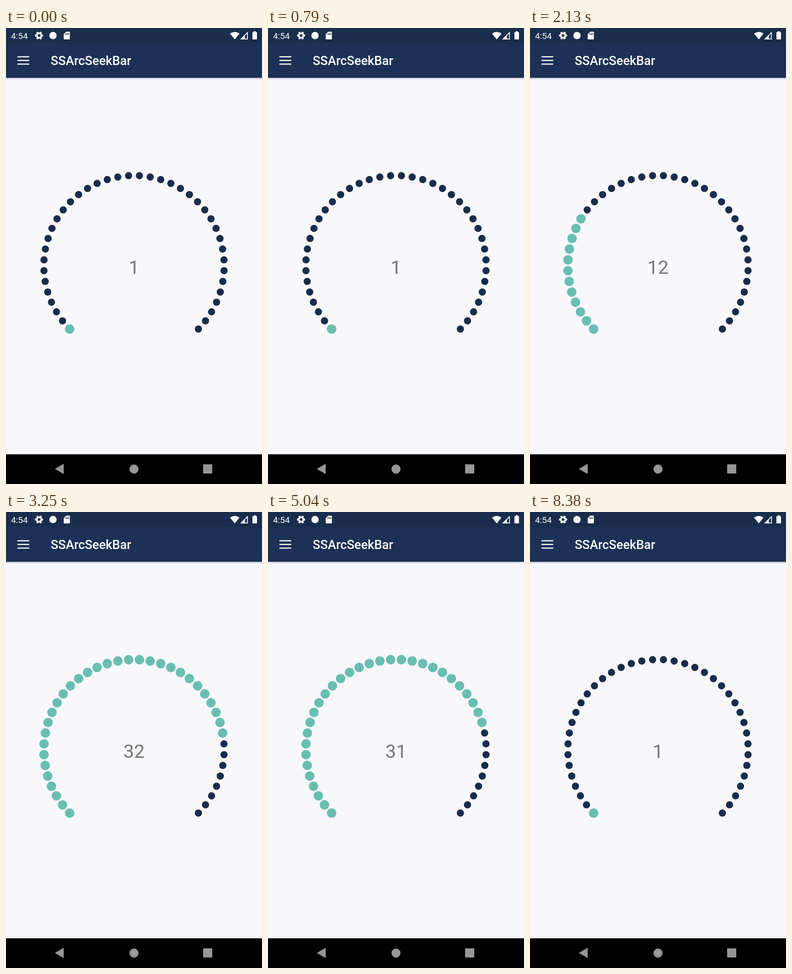
An HTML page for the animation above (8420 ms loop, 561 by 998 pixels).

```html
<!DOCTYPE html>
<html lang="en">
<head>
<meta charset="utf-8">
<title>SSArcSeekBar</title>
<style>
  html, body { margin: 0; width: 100%; height: 100%; overflow: hidden; background: #f8f8fc; }
  svg { display: block; width: 561px; height: 998px; font-family: Roboto, sans-serif; }
</style>
</head>
<body>
<svg viewBox="0 0 561 998">
  <defs>
    <linearGradient id="shadow" x2="0" y2="1">
      <stop stop-color="#c9ccd5"/>
      <stop offset="1" stop-color="#f8f8fc"/>
    </linearGradient>
  </defs>
  <rect width="561" height="998" fill="#f8f8fc"/>
  <rect y="109" width="561" height="5" fill="url(#shadow)"/>
  <rect width="561" height="109" fill="#1c3155"/>
  <rect width="561" height="33" fill="#1a2d4d"/>

  <g fill="#fff">
    <text x="11" y="24" font-size="19.1">4:54</text>
    <!-- gear -->
    <g fill="none" stroke="#fff">
      <circle cx="72.5" cy="16.5" r="4.8" stroke-width="3.6"/>
      <path id="teeth" stroke-width="4.4"/>
    </g>
    <circle cx="103" cy="16.5" r="8"/>
    <!-- memory card -->
    <path fill-rule="evenodd" d="M132 8H138.500Q140 8 140 9.500V23.500Q140 25 138.500 25H128Q126.500 25 126.500 23.500V13.500Z
      M130.500 11.500V15H132.200V11.500Z M133.500 11.500V15H135.200V11.500Z M136.500 11.500V15H138.200V11.500Z"/>
    <!-- wifi, signal, battery -->
    <path d="M501.300 25L491 12.200Q501.300 4.800 511.600 12.200Z"/>
    <path fill-rule="evenodd" d="M530 8V25H513Z M528.300 12.200L523.500 17V23.300H528.300Z"/>
    <path d="M543 9V7H547.200V9H549Q550 9 550 10V24Q550 25 549 25H541Q540 25 540 24V10Q540 9 541 9Z"/>
    <path d="M25 63H51M25 71H51M25 79H51" stroke="#fff" stroke-width="2.500"/>
    <text x="98" y="81" font-size="27.300" font-weight="500">SSArcSeekBar</text>
  </g>

  <g id="dots"></g>
  <text id="value" x="280.500" y="537.500" font-size="41.500" fill="#757575" text-anchor="middle"></text>

  <rect y="933" width="561" height="65"/>
  <g fill="#979797" stroke="#979797" stroke-linejoin="round">
    <path d="M108 965L126 954.500V975.500Z"/>
    <circle cx="280.500" cy="965.300" r="9.500"/>
    <rect x="432.500" y="955.500" width="19" height="19"/>
  </g>
</svg>
<script>
const LOOP = 8420, COUNT = 40, RAD = Math.PI / 180;
const center = { x: 280.5, y: 520.5 }, radius = 197.6, startAngle = 135.57;
const step = 2 * (270 - startAngle) / (COUNT - 1);

// Drag positions: [time in ms, value]
const drag = [[0, 1], [1430, 1], [2130, 12.4], [3250, 32.4], [3780, 40],
              [4380, 40], [5040, 31.4], [6590, 8.4], [7120, 1], [LOOP, 1]];

const polar = (c, r, deg) => [c.x + r * Math.cos(deg * RAD), c.y + r * Math.sin(deg * RAD)];

const gear = { x: 72.5, y: 16.5 };
document.getElementById("teeth").setAttribute("d",
  [0, 60, 120, 180, 240, 300].map(a => `M${polar(gear, 5, a)}L${polar(gear, 8.8, a)}`).join(""));

const group = document.getElementById("dots");
const label = document.getElementById("value");
const dots = Array.from({ length: COUNT }, (_, i) => {
  const dot = document.createElementNS("http://www.w3.org/2000/svg", "circle");
  const [x, y] = polar(center, radius, startAngle + i * step);
  dot.setAttribute("cx", x);
  dot.setAttribute("cy", y);
  return group.appendChild(dot);
});

function valueAt(time) {
  const i = drag.findIndex(([t]) => t > time);
  const [t0, v0] = drag[i - 1], [t1, v1] = drag[i];
  return Math.floor(v0 + (v1 - v0) * (time - t0) / (t1 - t0));
}

function draw() {
  const value = valueAt(performance.now() % LOOP);
  label.textContent = value;
  dots.forEach((dot, i) => {
    const on = i < value;
    dot.setAttribute("r", on ? 10.4 : 7.9);
    dot.setAttribute("fill", on ? "#69beb2" : "#192c4b");
  });
  requestAnimationFrame(draw);
}
draw();
</script>
</body>
</html>
```
